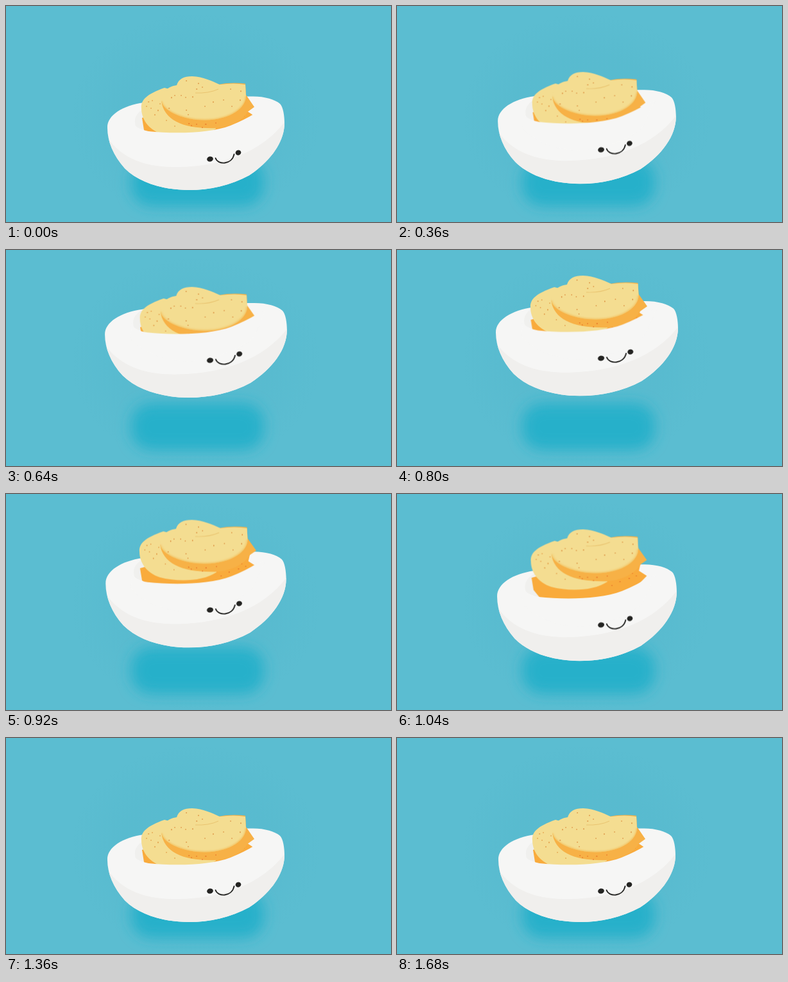
Recreate the animation shown at these times as an HTML page without scripts. Size 600 px wide and 338 px high, loop 1720 ms.

```html
<!DOCTYPE html>
<html lang="en">
<head>
<meta charset="utf-8">
<title>Bouncing egg</title>
<style>
  html, body { margin: 0; width: 100%; height: 100%; overflow: hidden; background: #5bbdd1; }
  svg { display: block; width: 100%; height: 100%; }

  .body, .front, .face, .base, .filling {
    animation: 1720ms linear infinite;
    animation-timing-function: cubic-bezier(.42, 0, .58, 1);
  }
  .body { animation-name: body-hop, swell; transform-origin: 296px 220px; }
  .front { animation-name: front-hop, swell; transform-origin: 296px 260px; }
  .face { animation-name: face-hop; transform-origin: 318px 240px; }
  .base { animation-name: base-hop; transform-origin: 300px 170px; }
  .filling { animation-name: filling-hop; transform-origin: 300px 150px; }

  @keyframes body-hop {
    0%, 76.7%, 100% { translate: 0 0; }
    11% { translate: 0 0; animation-timing-function: cubic-bezier(.5, 0, .58, 1); }
    43% { translate: 0 -62px; }
  }
  @keyframes swell {
    0%, 11%, 77%, 100% { scale: 1 1; }
    43% { scale: 1.03 1.01; }
    60.5% { scale: 1.014 1.03; }
  }
  @keyframes front-hop {
    0%, 11%, 76.7%, 100% { translate: 0 0; }
    43% { translate: 0 -71px; }
  }
  @keyframes face-hop {
    0%, 11%, 76.7%, 100% { transform: none; }
    43% { transform: translateY(-71.5px) scaleX(1.04); animation-timing-function: cubic-bezier(.45, 0, .58, 1); }
  }
  /* The filling lags behind the egg and drops back faster. */
  @keyframes base-hop {
    0%, 12%, 76.7%, 100% { transform: none; }
    47.7% { transform: translateY(-66px) scaleX(1.04); animation-timing-function: cubic-bezier(.35, .1, .75, .75); }
  }
  @keyframes filling-hop {
    0%, 12.8%, 76.7%, 100% { transform: none; }
    51.2% { transform: translateY(-72px) scaleX(1.035); animation-timing-function: cubic-bezier(.38, .1, .75, .75); }
  }

  .specks { fill: none; stroke-linecap: round; stroke-width: 1.7; }
</style>
</head>
<body>
<svg viewBox="0 0 600 338" preserveAspectRatio="none">
  <defs>
    <radialGradient id="halo">
      <stop offset=".6" stop-color="#48aec4" stop-opacity=".14"/>
      <stop offset="1" stop-color="#48aec4" stop-opacity="0"/>
    </radialGradient>
    <filter id="blur" x="-30%" y="-60%" width="160%" height="220%"><feGaussianBlur stdDeviation="10.5"/></filter>
    <filter id="soft" x="-10%" y="-30%" width="120%" height="160%"><feGaussianBlur stdDeviation="1.3"/></filter>
    <path id="egg" d="M158 191C157 172 180 156 215 151C270 141 340 142 382 141.500C402 141 419 146 427 153C432 158 434 172 434 183C434 213 412 243 379 265C350 281 317 288 285 288C246 288 208 277 185 254C167 234 158 211 158 191Z"/>
    <path id="slice" d="M242 149C242 135 252 126 266 124C269 114 277 110 290 110C308 111 320 117 333 123Q355 120 373 123L374 141C374 158 352 178 310 178.500C280 179 246 166 242 149Z"/>
    <clipPath id="in-egg"><use href="#egg"/></clipPath>
    <clipPath id="in-slice"><use href="#slice"/></clipPath>
  </defs>

  <rect width="600" height="338" fill="#5bbdd1"/>
  <ellipse cx="296" cy="175" rx="195" ry="165" fill="url(#halo)"/>
  <rect x="195" y="240" width="207" height="73" rx="32" fill="#27b0ca" filter="url(#blur)"/>

  <g class="body">
    <use href="#egg" fill="#f6f6f5"/>
    <path clip-path="url(#in-egg)" fill="#f0efed" d="M156 203C182 243 225 253 270 252C340 250 400 228 436 179V292H156Z"/>
  </g>

  <g class="front">
    <path fill="#f0f0ee" d="M216 160Q195 172 203 190L222 197Z"/>
  </g>

  <g class="base">
    <path fill="#f9ab3c" d="M212 175L215 194L226 208L300 215L370 190L387 172L375 164L378 150L300 150Z"/>
    <path class="specks" stroke="#e8752a" d="M365 168h.1M360 176h.5M315 186h.1M334 187h.1M346 181h.4M371 172h.1"/>
  </g>

  <g class="filling">
    <path fill="#f4dd91" d="M211 160C210 147 219 138 247 128L330 150L327 192C305 207 268 207 242 200C221 193 211 176 211 160Z"/>
    <path class="specks" stroke="#e39a45" d="M222 150h.5M228 148h.1M237 163v.7M226 160h.1M219 157h.1M240 153h.1M232 170v.5M250 179h.1M263 188h.1"/>
    <path fill="#f7b146" d="M242 148C246 180 278 193 330 191C356 188 372 175 376 166L387 158L374 139L373 121.500Q350 119 330 123Z"/>
    <path class="specks" stroke="#e8752a" d="M285 184h.4M297 185h.1M311 185h.7M306 190h.1M289 187h.1M327 183h.1"/>
    <use href="#slice" fill="#f4dd91"/>
    <g clip-path="url(#in-slice)">
      <path fill="none" stroke="#f3b850" stroke-opacity=".65" stroke-width="3" filter="url(#soft)" d="M242 149C246 166 280 179 310 178.500C352 178 374 158 374 141"/>
    </g>
    <path fill="none" stroke="#e9c470" stroke-width="1" d="M295 136Q316 137 331 130"/>
    <path class="specks" stroke="#dc9040" d="M281 117h.3M300 121v.3M297 130h.5M258 143v.6M263 140h.1M273 140h.1M280 143h.1M291 142v.5M366 133v.5M365 147v.6M350 130h.1M339 147h.1M254 160h.5M281 163h.3M284 170h.1M323 150v.4M352 157h.1M310 157h.1M306 127h.1"/>
  </g>

  <g class="front">
    <path fill="#f6f6f5" d="M198 183Q204 193 222 196C260 200 316 200 350 187Q372 178 388 168L402 162L382 205Q345 236 285 241Q225 238 196 205Z"/>
  </g>

  <g class="face" fill="#242422">
    <ellipse cx="318" cy="239.500" rx="4.900" ry="4" transform="rotate(-12 318 239.500)"/>
    <ellipse cx="362" cy="229.500" rx="4.400" ry="4" transform="rotate(-20 362 229.500)"/>
    <path fill="none" stroke="#242422" stroke-width="1.800" stroke-linecap="round" d="M326.500 238C330 249 352 249 355.500 232"/>
  </g>
</svg>
</body>
</html>
```
